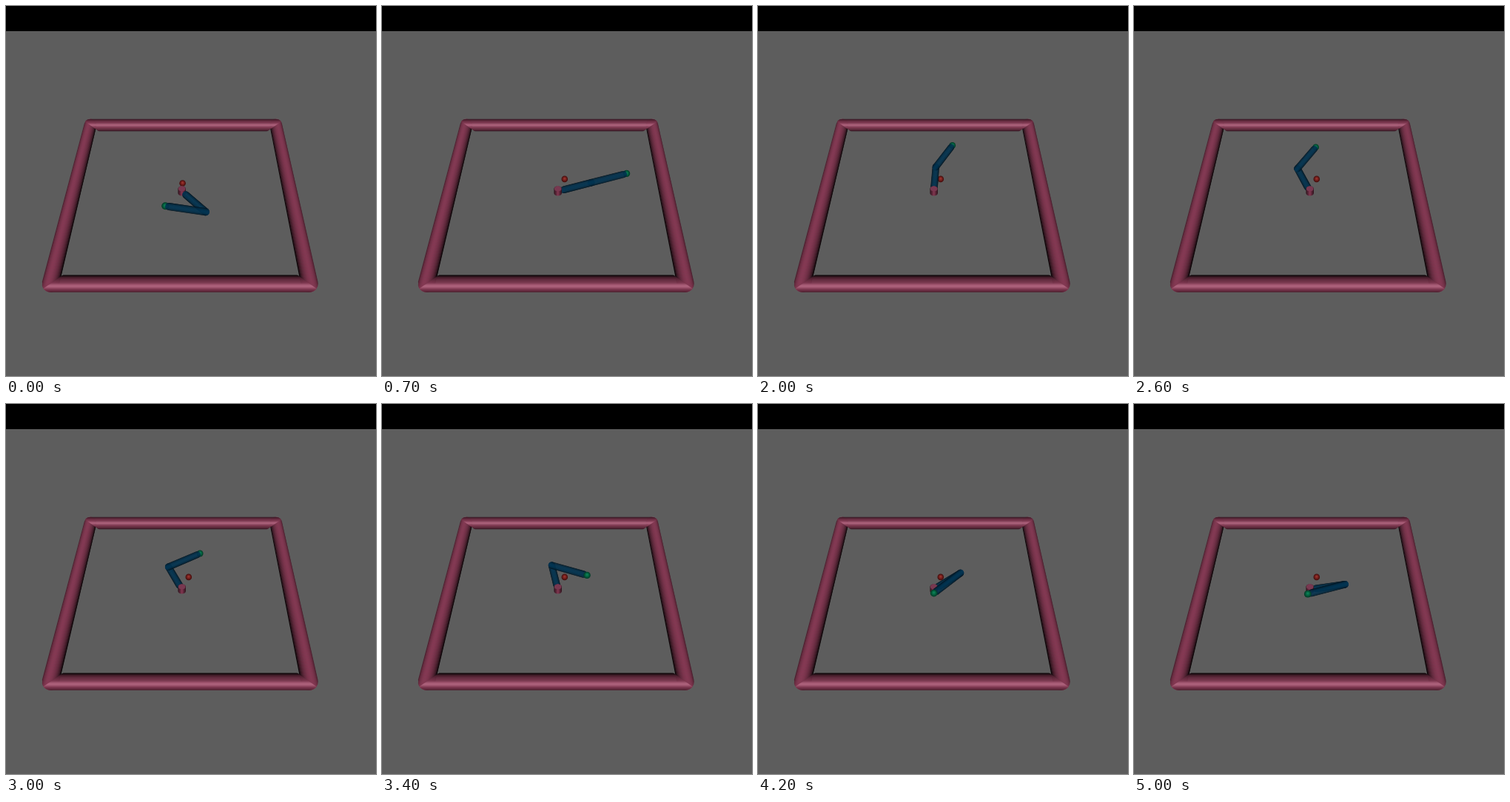
Animation, 500 px wide and 500 px high, one loop 5.1 s. Source, as an HTML page with a canvas:

```html
<!DOCTYPE html>
<html lang="en">
<head>
<meta charset="utf-8">
<title>Two-link arm</title>
<style>
html, body { margin: 0; width: 100%; height: 100%; overflow: hidden; background: #5d5d5d; }
canvas { display: block; }
</style>
</head>
<body>
<canvas id="stage" width="500" height="500"></canvas>
<script>
const ctx = document.getElementById('stage').getContext('2d');
const STEP = 100, COUNT = 51, RAD = Math.PI / 180;

// link headings in degrees, one key every 700 ms
const KEY_GAP = 700;
const UPPER = [-1, 20, 54.7, 92, 115, 96, 41, 14, 0];
const LOWER = [-1, 20, 54.7, 63, 52, -36, -133, -157, -176];

const PINK = { rgb: [130, 55, 81], gloss: 42 };
const BLUE = { rgb: [2, 52, 82], gloss: 0 };

// ground plane to screen
function project(x, y) {
  const w = 0.0020537 + 0.0011283 * y;
  return { x: 237.6 + (x + 0.014 * y) / w, y: (0.51425 - 0.43047 * y) / w, scale: 1 / w };
}

function polar(from, angle, len) {
  return [from[0] + len * Math.cos(angle), from[1] + len * Math.sin(angle)];
}

// round surface lit from the angle `lean`, t runs from -1 to 1 across it
function shade({ rgb, gloss }, t, lean) {
  const facing = Math.max(0, Math.cos(Math.asin(t) - lean));
  const shine = gloss * facing ** 24;
  return `rgb(${rgb.map(c => Math.round(c * (0.08 + 0.92 * facing) + shine))})`;
}

// tapered capsule, shaded across its width in thin strips
function capsule(p, q, radius, paint, lean = 0) {
  const a = project(...p), b = project(...q);
  const ra = radius * a.scale, rb = radius * b.scale;
  const len = Math.hypot(b.x - a.x, b.y - a.y);
  const dx = (b.x - a.x) / len, dy = (b.y - a.y) / len;
  const lit = { rgb: paint.rgb, gloss: paint.gloss * dx * dx };
  const corner = (end, r, t, side) => {
    const cap = side * r * Math.sqrt(1 - t * t);
    ctx.lineTo(end.x - dy * r * t + dx * cap, end.y + dx * r * t + dy * cap);
  };
  const n = 24;
  for (let i = 0; i < n; i++) {
    const t0 = -1 + 2 * i / n, t1 = Math.min(1, t0 + 3.2 / n);
    ctx.fillStyle = shade(lit, t0 + 1 / n, lean);
    ctx.beginPath();
    corner(a, ra, t0, -1);
    corner(b, rb, t0, 1);
    corner(b, rb, t1, 1);
    corner(a, ra, t1, -1);
    ctx.fill();
  }
}

function ball(x, y, r, light, dark) {
  const g = ctx.createRadialGradient(x, y - r * 0.2, 0, x, y, r);
  g.addColorStop(0, light);
  g.addColorStop(1, dark);
  ctx.fillStyle = g;
  ctx.beginPath();
  ctx.arc(x, y, r, 0, 7);
  ctx.fill();
}

function hub() {
  const x = 237.7, top = 247, bottom = 252.8, rx = 5.3, ry = 3.7;
  const g = ctx.createLinearGradient(x - rx, 0, x + rx, 0);
  [-0.95, 0, 0.95].forEach(t => g.addColorStop((t + 1) / 2, shade({ rgb: PINK.rgb, gloss: 0 }, t, 0)));
  ctx.fillStyle = g;
  ctx.beginPath();
  ctx.ellipse(x, bottom, rx, ry, 0, 0, Math.PI);
  ctx.ellipse(x, top, rx, ry, 0, Math.PI, 2 * Math.PI);
  ctx.fill();
  ctx.fillStyle = '#783850';
  ctx.beginPath();
  ctx.ellipse(x, top, rx - 0.5, ry - 0.4, 0, 0, 7);
  ctx.fill();
}

// horizontal wall, mitred along the diagonals of the square
function mitred(p, q, radius, lean) {
  ctx.save();
  ctx.beginPath();
  for (const [x, y] of [[0, 0], p, q]) {
    const v = project(x * 1.3, y * 1.3);
    ctx.lineTo(v.x, v.y);
  }
  ctx.clip();
  capsule(p, q, radius, PINK, lean);
  ctx.restore();
}

function backdrop() {
  ctx.fillStyle = '#5d5d5d';
  ctx.fillRect(0, 0, 500, 500);
  ctx.fillStyle = '#000';
  ctx.fillRect(0, 0, 500, 34);
  const s = 0.3, r = 0.02;
  capsule([-s, -s], [-s, s], r, PINK, -0.3);
  capsule([s, -s], [s, s], r, PINK, 0.3);
  mitred([-s, s], [s, s], r, 0);
  mitred([-s, -s], [s, -s], r, 0.3);
}

// smooth curve through evenly spaced keys
function curve(keys, t) {
  const i = Math.floor(t / KEY_GAP), u = t / KEY_GAP - i;
  const [a, b, c, d] = [-1, 0, 1, 2].map(k => keys[Math.max(0, Math.min(keys.length - 1, i + k))]);
  return b + u / 2 * (c - a + u * (2 * a - 5 * b + 4 * c - d + u * (3 * (b - c) + d - a)));
}

function link(p, q) {
  capsule(p, q, 0.01, BLUE);
}

function arm(upper, lower) {
  const elbow = polar([0, 0], upper, 0.1);
  const tip = project(...polar(elbow, lower, 0.11));
  const fingertip = () => ball(tip.x, tip.y, 0.01 * tip.scale, '#0a8c5c', '#003824');

  const near = Math.sin(upper) < 0;
  if (near) hub();
  link(polar([0, 0], upper, 0.018), elbow);
  if (!near) hub();

  const facing = Math.sin(lower) < 0.1;
  if (!facing) fingertip();
  link(elbow, polar(elbow, lower, 0.1));
  if (facing) fingertip();
}

backdrop();
const still = document.createElement('canvas');
still.width = still.height = 500;
still.getContext('2d').drawImage(ctx.canvas, 0, 0);

function draw() {
  const n = Math.floor(performance.now() / STEP) % COUNT, t = n * STEP;
  ctx.drawImage(still, 0, 0);
  // the loop opens on a separate pose, then the arm restarts straight
  const opening = n === 0;
  const [goalX, goalY] = opening ? [238.6, 239.5] : [246.8, 233.9];
  const [upper, lower] = opening ? [-50, 169] : [curve(UPPER, t), curve(LOWER, t)];
  ball(goalX, goalY, 4.3, '#a83630', '#400a0a');
  arm(upper * RAD, lower * RAD);
  requestAnimationFrame(draw);
}
draw();
</script>
</body>
</html>
```
